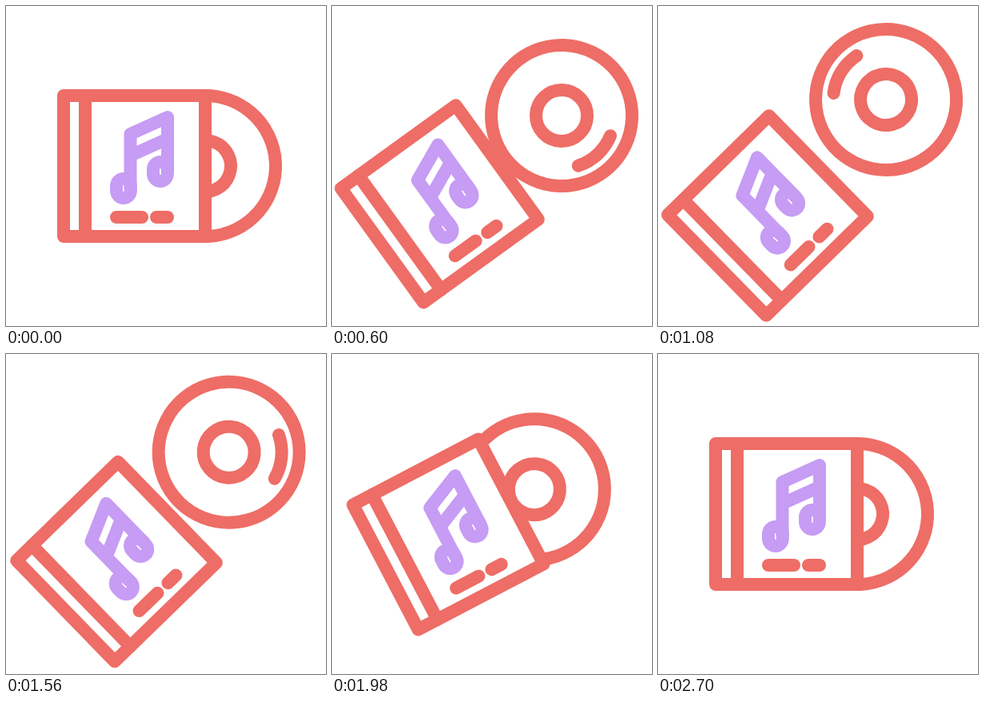
These frames come from a looping animation (400x400 px, 4.73 s). An HTML page:

```html
<!DOCTYPE html>
<html lang="en">
<head>
<meta charset="utf-8">
<title>Music album</title>
<style>
  html, body { margin: 0; height: 100%; overflow: hidden; background: #fff; }
  svg { display: block; width: 100%; height: 100%; }
  g { fill: none; stroke: #ee6d66; stroke-width: 16; stroke-linecap: round; stroke-linejoin: round; }
  #note { stroke: #c69cf4; }
</style>
</head>
<body>
<svg viewBox="0 0 400 400">
  <g id="album">
    <g id="disc">
      <circle r="88"/>
      <circle r="32"/>
      <path d="M60-27.5A66 66 0 0 1 60 27.5"/>
    </g>
    <g transform="translate(-160.5 -200)">
      <rect x="72" y="112" width="177" height="176" fill="#fff"/>
      <path d="M99 112V288M138 264H170M188 264H202"/>
      <g id="note">
        <rect x="138" y="216" width="17.8" height="24" rx="8.9"/>
        <rect x="184" y="195" width="17.8" height="24" rx="8.9"/>
        <path d="M155.5 228V160L202 139V207M155.5 187L202 166"/>
      </g>
    </g>
  </g>
</svg>
<script>
const LOOP = 4730, STEP = 30, END = 2700;
const album = document.getElementById("album");
const disc = document.getElementById("disc");

const progress = (t, from, to) => Math.min(1, Math.max(0, (t - from) / (to - from)));
const smooth = u => u * u * (3 - 2 * u);

function draw() {
  const t = Math.min(END, Math.floor(performance.now() % LOOP / STEP) * STEP);

  // Eject starts fast, retract starts slowly, settle is even
  const eject = end => smooth(1 - (1 - progress(t, 0, end)) ** 1.5);
  const retract = (from, to, power) => smooth(progress(t, from, to) ** power);
  const settle = from => smooth(progress(t, from, END));

  const x = 160.5 - 26 * eject(600) + 2.5 * retract(600, 1080, 1)
    + 12.3 * retract(1080, 2220, 2) + 11.2 * settle(2220);
  const y = 200 + 62 * (eject(1120) - retract(1080, 2220, 2.45));
  const tilt = -44.4 * eject(1050) + 50.6 * retract(1320, 2310, 2.35) - 6.2 * settle(2310);
  const slide = 88.5 + 118.7 * eject(1000) - 132.2 * retract(1080, 2250, 1.94) + 13.5 * settle(2250);

  // Two full turns, slowing a little
  const turn = progress(t, 0, 2100);
  const spin = 199 + 720 * turn * (1.26 - 0.26 * turn);

  album.setAttribute("transform", `translate(${x} ${y}) rotate(${tilt})`);
  disc.setAttribute("transform", `translate(${slide} 0) rotate(${spin})`);
  requestAnimationFrame(draw);
}
draw();
</script>
</body>
</html>
```
